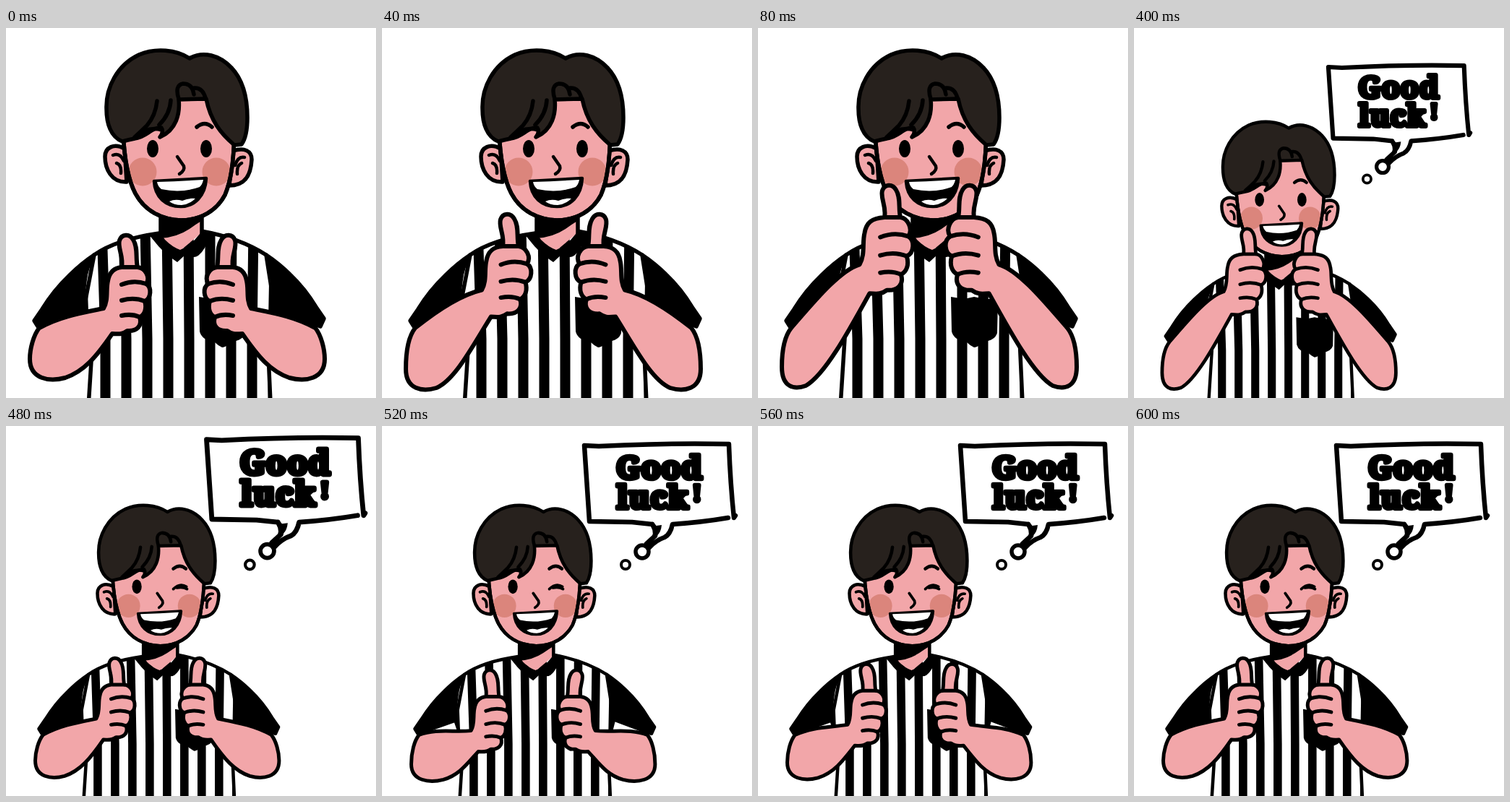
An HTML page for the animation above (2 s loop, 512x512 px).

```html
<!DOCTYPE html>
<html lang="en">
<head>
<meta charset="utf-8">
<title>Good luck!</title>
<style>
  html, body { margin: 0; width: 100%; height: 100%; overflow: hidden; background: #fff; }
  svg { display: block; width: 100vw; height: 100vh; }
  .line { fill: none; stroke: #000; stroke-width: 5.5; stroke-linecap: round; stroke-linejoin: round; }
  .skin { fill: #f2a6a9; }
  .hair { fill: #27211d; }
  .white { fill: #fff; }
  .black { fill: #000; }
  .cheek { fill: #db857c; }
  .brush { stroke-width: 6.5; }
  .arm .line { stroke-width: 6; }
  text { font: 700 44px "Noto Serif", serif; letter-spacing: .8px; stroke: #000; stroke-width: 6.5; stroke-linejoin: round; }
</style>
</head>
<body>
<svg viewBox="0 0 512 512">
  <defs>
    <clipPath id="torso">
      <path d="M212 284C170 290 142 300 122 314L107 392L120 430L112 540H368L362 430L372 390L360 314C338 300 310 288 270 281Z"/>
    </clipPath>
  </defs>

  <g id="man">
    <!-- shirt -->
    <g clip-path="url(#torso)">
      <rect class="white" x="90" y="270" width="300" height="270"/>
      <g id="stripes"></g>
    </g>
    <path class="line" d="M212 284C170 290 142 300 122 314L107 392L120 430L113 540M367 540L362 430L372 390L360 314C338 300 310 288 270 281"/>
    <path class="line black" d="M39 405L50 389Q66 363 88 342Q104 326 122 314Q111 330 109 350L104 392L44 413Z"/>
    <path class="line black" d="M440 402L429 386Q414 361 393 341Q378 326 360 314Q367 330 368 350L373 390L435 413Z"/>
    <path class="black" d="M267 372L285 375L299 372L314 375L332 375L331 422Q328 432 313 434Q304 442 299 442Q293 439 289 435Q271 432 268 420Z"/>

    <!-- neck and collar -->
    <path class="skin" d="M214 258V290L240 309L270 284V258Z"/>
    <path d="M213 258H272V266Q262 272 254 278Q236 290 213 291Z"/>
    <path class="line" d="M214 262V288M271 262V284"/>
    <path d="M197 285L214 284L220 293Q230 303 241 307Q256 301 268 285L272 278L281 288Q277 306 266 315Q258 320 250 312L237 324Q222 314 211 302Z"/>

    <!-- head -->
    <path class="line skin" d="M164 167C150 159 137 165 137 178C137 195 146 214 167 213Z"/>
    <path class="line skin" d="M314 170C330 165 340 170 340 182C339 201 333 218 309 218Z"/>
    <path class="line" style="stroke-width:4.5" d="M148 176Q158 172 163 184M153 187Q160 189 159 201M330 179Q321 177 317 190M326 187Q319 190 320 202"/>
    <path class="skin" id="face" d="M162 145C164 185 169 210 179 229C192 253 215 265 242 266C270 266 292 252 303 231C311 212 315 188 316 145L280 85H190Z"/>
    <circle class="cheek" cx="189" cy="199" r="19.5"/>
    <circle class="cheek" cx="291" cy="199" r="19.5"/>
    <use href="#face" class="line" style="fill-opacity:0"/>
    <path class="line" d="M162 145C164 185 169 210 179 229C192 253 215 265 242 266C270 266 292 252 303 231C311 212 315 188 316 145"/>
    <path class="line hair" d="M161 157C145 151 139 132 139 112C138 82 154 51 184 37C207 27 236 30 254 42C273 31 296 38 312 55C329 73 334 99 334 124C334 141 331 154 326 161L316 162C297 146 283 128 277 98L239 99C241 118 236 141 213 151C217 146 217 141 215 138C201 137 195 151 178 153Q168 155 161 157Z"/>
    <path class="line" d="M209 101Q207 121 195 135Q187 143 178 151M228 100Q227 119 212 134M239 98Q233 79 245 77Q258 77 260 92M260 83Q272 82 276 97M181 152Q195 135 216 141"/>
    <path class="line" d="M264 137Q275 128 285 137"/>
    <ellipse cx="203" cy="167" rx="8" ry="12"/>
    <ellipse id="eye" cx="277" cy="167" rx="8" ry="12"/>
    <path id="wink" class="line" style="stroke-width:4.5" d="M264 171Q275 160 286 167M270 169Q280 167 287 171"/>
    <path class="line" style="stroke-width:4.5" d="M237 178L246 191Q248 197 240 202"/>
    <path class="line black" style="stroke-width:4.5" d="M205 212Q240 210 277 208C276 233 260 247 242 247C221 247 206 234 205 212Z"/>
    <path class="white" d="M209 213Q242 212 273 210Q272 216 268 220Q243 229 215 223Q210 219 209 213Z"/>
    <path class="white" d="M226 240Q234 236 244 239Q253 235 262 236Q254 244 243 245Q232 245 226 240Z"/>

    <!-- arms -->
    <g class="arm"></g>
    <g class="arm" transform="translate(474 0) scale(-1 1)"></g>
  </g>

  <g id="bubble">
    <path class="white" d="M280 27L480 25L487 127L402 136L392 154L369 168L379 150L374 136L287 132Z"/>
    <path class="line brush" d="M374 136L346 133L287 132Q284 90 280 27L300 28Q400 23 480 25Q482 80 487 127L489 124M479 127Q444 133 402 136Q399 150 391 154Q379 158 369 169M374 136Q381 144 378 152L366 163"/>
    <path d="M372 139L387 137Q386 147 381 151L371 157Q378 149 372 139Z"/>
    <circle class="line white" cx="360" cy="174" r="9"/>
    <circle class="line white" style="stroke-width:4" cx="337" cy="192" r="6"/>
    <text x="324" y="73">Good</text>
    <text x="325" y="114">luck</text>
    <text x="430" y="104" style="font-size:30px">!</text>
  </g>
</svg>

<script>
const $ = id => document.getElementById(id);
const LOOP = 2000;

// placements: scale, x, y
const FULL = [1, 0, 0], SMALL = [.793, 12.7, 105.2], REST = [.827, 13.2, 84.2];
const SHRUNK = [.939, 6, 28.7], BIG = [1.117, -38.4, -22.5], MID = [1.05, -16.5, -9.6], STILL = [1, 0, 0];

// arm poses: hand dx, hand dy, elbow bottom
const LOW = [0, 0, 485], HALF = [7, -29, 499], HIGH = [15, -69, 496];
const DIP = [-2, 20, 491], RISE = [-1, 10, 488];

// start ms, arms, body, bubble, wink
const STEPS = [
  [0, LOW, FULL, null, false],
  [40, HALF, FULL, null, false],
  [80, HIGH, FULL, null, false],
  [400, HIGH, SMALL, SHRUNK, false],
  [440, HALF, REST, BIG, true],
  [480, LOW, REST, MID, true],
  [520, DIP, REST, STILL, true],
  [560, RISE, REST, STILL, true],
  [600, LOW, REST, STILL, true]
];

for (let k = -4.5; k < 5; k++) {
  const top = 237.5 + 30 * k, low = 239 + 29 * k;
  $("stripes").innerHTML +=
    `<path d="M${top - 7} 275H${top + 7}L${low + 7} 430V540H${low - 7}V430Z"/>`;
}

function armShape(dx, dy, elbow) {
  // the fist grows a little from its knuckles as it rises
  const grow = 1 + Math.max(0, -dy) * .0021;
  const p = (x, y) => y > 331
    ? `${200 + (x - 200) * grow + dx} ${331 + (y - 331) * grow + dy} `
    : `${x + dx} ${y + dy} `;
  const outline =
    `M46 415C75 ${399 + .25 * dy} ${105 + .5 * dx} ${394 + .85 * dy} ${p(135, 388)}` +
    `C${p(142, 376)}${p(138, 362)}${p(141, 350)}C${p(143, 338)}${p(149, 332)}${p(160, 331)}` +
    `C${p(163, 316)}${p(154, 304)}${p(157, 294)}C${p(160, 285)}${p(171, 284)}${p(176, 293)}` +
    `C${p(183, 304)}${p(179, 318)}${p(182, 331)}C${p(193, 332)}${p(200, 345)}${p(194, 354)}` +
    `C${p(202, 359)}${p(201, 374)}${p(192, 378)}C${p(195, 388)}${p(192, 397)}${p(185, 400)}` +
    `C${p(189, 412)}${p(181, 420)}${p(168, 419)}C${p(160, 425)}${p(154, 423)}${p(147, 423)}` +
    `C125 ${455 + .5 * dy} ${108 + .23 * dy} ${elbow - 10 + .08 * dy} ${82 + .23 * dy} ${elbow - 1}` +
    `C${60 + .15 * dy} ${elbow + 5} 33 ${elbow + 1} 33 ${elbow - 27}C33 444 38 425 46 415Z`;
  const creases =
    `M${p(162, 331)}L${p(182, 331)}` +
    `M${p(160, 355)}Q${p(177, 348)}${p(194, 354)}` +
    `M${p(160, 377)}Q${p(177, 372)}${p(192, 378)}` +
    `M${p(160, 398)}Q${p(174, 395)}${p(185, 400)}`;
  return `<path class="line skin" d="${outline}"/><path class="line" d="${creases}"/>`;
}

function place(el, [s, x, y]) {
  el.setAttribute("transform", `matrix(${s} 0 0 ${s} ${x} ${y})`);
}

function show(el, on) {
  el.style.display = on ? "" : "none";
}

let shown = null;
function draw(now) {
  const t = now % LOOP;
  const step = STEPS.findLast(s => s[0] <= t);
  if (step === shown) return;
  shown = step;
  const [, arms, body, bubble, wink] = step;
  document.querySelectorAll(".arm").forEach(a => a.innerHTML = armShape(...arms));
  place($("man"), body);
  show($("bubble"), bubble);
  if (bubble) place($("bubble"), bubble);
  show($("eye"), !wink);
  show($("wink"), wink);
}

const start = performance.now();
function tick() {
  draw(performance.now() - start);
  requestAnimationFrame(tick);
}
tick();
</script>
</body>
</html>
```
